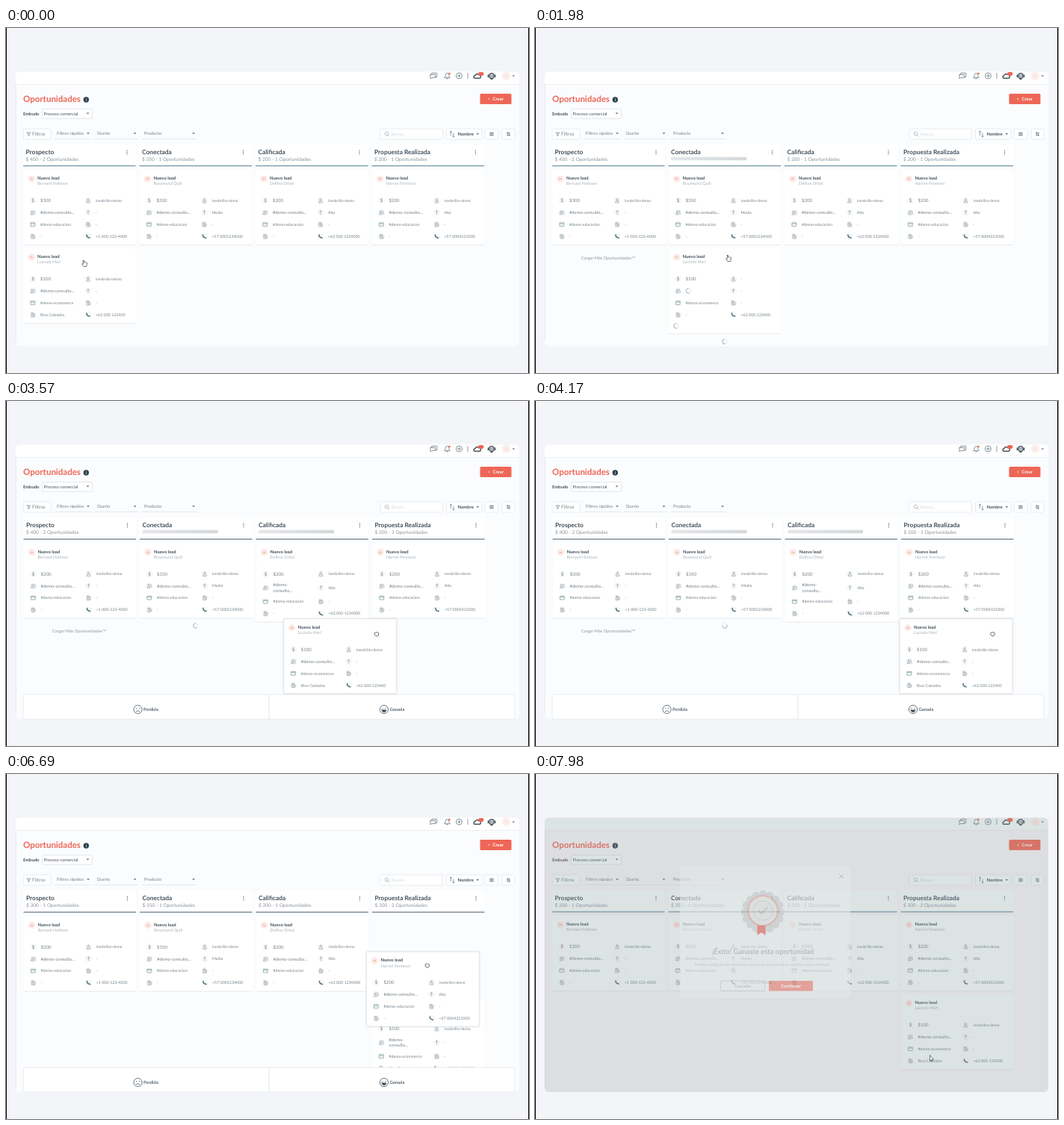
An HTML page that plays this animation: 700x462 px, repeating every 8000 ms.

```html
<!DOCTYPE html>
<html lang="es">
<head>
<meta charset="utf-8">
<title>Tablero de oportunidades</title>
<style>
  html, body { margin: 0; width: 100%; height: 100%; overflow: hidden; background: #f3f5f8; }
  svg { display: block; width: 100%; height: 100%; font-family: Lato, "Open Sans", sans-serif; text-rendering: geometricPrecision; }
  .lift { filter: drop-shadow(0 .5px 1px #0002); }
</style>
</head>
<body>
<svg id="stage" viewBox="0 0 700 462"></svg>
<script>
const LOOP = 8000, RED = '#ee6656', INK = '#43515d', MID = '#74808a', PALE = '#a9b1b8', EDGE = '#e3e7eb';
const stage = document.getElementById('stage');
const colX = [23, 178.5, 334, 489.5];
const titles = ['Prospecto', 'Conectada', 'Calificada', 'Propuesta Realizada'];
const USER = 'inesbrillo+demo', TAG = '#demo-educacion';

const lead = (name, price, level, tag, firm, phone) => ({ name, price, level, tag, firm, phone });
const leads = [
  lead('Bernard Hollowe', '$300', '-', TAG, '-', '+1 000-123-4000'),
  lead('Rosamund Quill', '$350', 'Media', TAG, '-', '+57 0001234000'),
  lead('Delfina Orbel', '$200', 'Alta', TAG, '-', '+62 000 1234000'),
  lead('Harriet Fenmoor', '$200', 'Alta', TAG, '-', '+57 0004321000')
];
const mover = lead('Lucinda Marl', '$100', '-', '#demo-ecommerce', 'Rivo Calzados', '+62 000 123400');

// dx, dy: where the pointer holds the card
const drags = [
  { from: 560, to: 1560, col: 0, dx: 87.7, dy: 22.3 },
  { from: 2450, to: 2900, col: 1, dx: 84, dy: 18 },
  { from: 3270, to: 4560, col: 2, dx: 124.5, dy: 20.3 },
  { from: 6460, to: 7150, col: 3, dx: 81.5, dy: 18.3, first: true }
];
const DROP1 = 1560, DROP2 = 2900, DROP3 = 4560, SETTLED = 6150, MODAL = 7830;

// time, x, y of the pointer
const path = [
  [0, 105, 315], [610, 105, 319], [1500, 259, 308], [2450, 259, 308], [2860, 416, 311], [2920, 416, 311],
  [3230, 458, 312], [3270, 458, 312], [4200, 613, 312], [4560, 613, 312], [5300, 568, 262], [6330, 568, 262],
  [6460, 575, 208], [6515, 575, 208], [7060, 530, 405], [7150, 530, 405], [7400, 530, 381], [LOOP, 530, 381]
];

const mix = (a, b, k) => a + (b - a) * k;
const tint = (a, b, k) => `rgb(${a.map((v, i) => Math.round(mix(v, b[i], k)))})`;

function pointerAt(t) {
  const i = path.findIndex(p => p[0] > t), a = path[i - 1], b = path[i];
  const u = (t - a[0]) / (b[0] - a[0]), k = u * u * (3 - 2 * u);
  return [mix(a[1], b[1], k), mix(a[2], b[2], k)];
}

// y is the middle of the capitals
const text = (x, y, s, size, fill = MID, weight = 400, more = '') =>
  `<text x="${x}" y="${y + size * .36}" font-size="${size}" fill="${fill}" font-weight="${weight}" ${more}>${s}</text>`;
const box = (x, y, w, h, fill, stroke = 'none', r = 1.5, more = '') =>
  `<rect x="${x}" y="${y}" width="${w}" height="${h}" rx="${r}" fill="${fill}" stroke="${stroke}" stroke-width=".8" ${more}/>`;
const dot = (x, y, r, fill, stroke = 'none', w = .8) =>
  `<circle cx="${x}" cy="${y}" r="${r}" fill="${fill}" stroke="${stroke}" stroke-width="${w}"/>`;
const draw = (x, y, d, stroke = MID, w = .8, fill = 'none') =>
  `<path transform="translate(${x} ${y})" d="${d}" fill="${fill}" stroke="${stroke}" stroke-width="${w}" stroke-linecap="round" stroke-linejoin="round"/>`;
const caret = (x, y) => draw(x, y, 'M-1.8-.9h3.6L0 1z', 'none', 0, '#5d6973');
const middle = 'text-anchor="middle"';

const icons = {
  user: 'M-1.2-1.3a1.2 1.2 0 1 0 2.4 0a1.2 1.2 0 1 0-2.4 0M-2.3 2.5q0-2.3 2.3-2.3t2.3 2.3z',
  people: 'M-2.2-1a1.1 1.1 0 1 0 2.2 0a1.1 1.1 0 1 0-2.2 0M-3 2.4q0-2 1.9-2t1.9 2zM.9-2.2q1.6 0 1.5 1.2t-1 1.1q1.6.3 1.7 2',
  purse: 'M-2.7-2.2h5.4v4.6h-5.4zM-2.7-1h5.4',
  firm: 'M-2.1 2.5v-5h2.7v5zM.6-.8h1.8v3.3h-1.8M-1.2-1.1h.8M-1.2.5h.8',
  up: 'M0 2.3v-4.6M-1.6-.8L0-2.3l1.6 1.5',
  phone: 'M-2.1-2.1q.3 3.7 4.2 4.2'
};
function icon(kind, x, y) {
  const back = dot(x, y, 4.6, '#f6f8f9');
  if (kind === 'cash') return back + text(x, y, '$', 6.2, MID, 400, middle);
  return back + (kind === 'phone'
    ? draw(x, y, icons.phone, '#4f6c78', 1.5)
    : draw(x, y, icons[kind], kind === 'purse' ? '#84a39f' : '#96a1aa', .7));
}

const spinner = (x, y, t) =>
  dot(x, y, 3.2, 'none', '#e4e7e9', .9) +
  `<g transform="rotate(${t * .45} ${x} ${y})">${draw(x, y, 'M0-3.2a3.2 3.2 0 0 1 0 6.4', '#a6aeb5', .9)}</g>`;

function card(x, y, d, paper, t, { wrap, busy, lift } = {}) {
  const rows = [41, 57, 73, 89].map((v, i) => y + v + (wrap ? [0, 2.5, 5, 5][i] : 0));
  const h = busy ? 114 : wrap ? 105 : 100;
  const left = ['cash', 'people', 'purse', 'firm'], right = ['user', 'up', 'firm', 'phone'];
  let s = lift
    ? `<g class="lift">${box(x, y, 151, h, paper, '#dde1e5')}</g>`
    : box(x, y + 1, 151, h, '#e8ecef') + box(x, y, 151, h, paper);
  s += dot(x + 11, y + 12, 4.6, '#fde9e5') + text(x + 11, y + 12, 'NL', 3.2, '#e99a8f', 700, middle);
  s += text(x + 19, y + 11, 'Nuevo lead', 5.9, INK, 700) + text(x + 19, y + 18.5, d.name, 5.5, PALE);
  rows.forEach((r, i) => s += icon(left[i], x + 13, r) + icon(right[i], x + 87, r));
  s += text(x + 23, rows[0], d.price, 6);
  if (busy) s += spinner(x + 27, rows[1], t) + spinner(x + 10.5, y + 104, t);
  else if (wrap) s += text(x + 23, rows[1] - 3.6, '#demo-', 5.8) + text(x + 23, rows[1] + 3.6, 'consulto...', 5.8);
  else s += text(x + 23, rows[1], '#demo-consulto...', 5.8);
  s += text(x + 23, rows[2], d.tag, 5.2) + text(x + 23, rows[3], busy ? '-' : d.firm, 5.3);
  s += text(x + 97, rows[0], busy ? '-' : USER, 5) + text(x + 97, rows[1], d.level, 5.2);
  return s + text(x + 97, rows[2], '-', 5.2) + text(x + 97, rows[3], d.phone, 5.3);
}

function topBar(paper) {
  return `<path d="M13 75.5V64.5q0-6 6-6H681q6 0 6 6V75.5z" fill="${paper}"/>` +
    draw(13, 75.5, 'M0 0H674', '#e9ecef') +
    draw(572, 64, 'M-4-1.5h1.8v-2.2h7v5.2h-1.6M-4-1.5v5.4l1.6-1.4h5v-4h-4.8', '#6d7983') +
    draw(590.5, 64, 'M-3.5 2.4q1.2-1 1.2-3 .2-3 2.3-3t2.3 3q0 2 1.2 3zM-1 3.8h2', '#6d7983') + dot(593.5, 61, 1.3, RED) +
    dot(606.5, 64, 4, 'none', '#6d7983') + draw(606.5, 64, 'M-2 0h4M0-2v4', '#6d7983') +
    draw(618, 64, 'M0-3.5v7') +
    draw(631, 65, 'M-4 2.2q-2.4-3 1-3.4 1-3.4 4-1.6 3.6.2 3.4 3.4-.4 2-2.4 1.6z', '#4a565f', 1.5) + box(632, 59, 7.5, 5, RED, 'none', 2.4) +
    draw(650, 64, 'M-4.6-1v2.4M4.6-1v2.4', '#4a565f', 1.5) + dot(650, 64, 3.3, '#c3c9ce', '#4a565f', 1.3) +
    draw(650, 64, 'M-1.2 0h0M1.2 0h0M-1 4.4h2', '#3d4952', 1.2) +
    dot(669.5, 64, 5.7, '#fdeeec') + text(669.5, 64, 'L', 4.5, '#eeb4ad', 400, middle) + caret(679.3, 64.3);
}

function toolbar(paper) {
  const pick = (x, w, s) => text(x + 3, 141, s, 5.8) + caret(x + w - 4, 141.2) + draw(x, 148.5, `M0 0h${w}`, '#d5dade', .6);
  const button = (x, w) => box(x, 135, w, 14, paper, EDGE);
  return text(23, 95, 'Oportunidades', 11.5, RED, 700) +
    dot(107.3, 96, 3.7, '#2f4350') + text(107.3, 96, 'i', 5, '#fff', 700, middle) +
    box(634.5, 88, 42, 14, RED) + text(644.5, 95, '+', 6, '#fff') + text(651.5, 95, 'Crear', 6, '#fff', 700) +
    text(23, 115, 'Embudo', 5.8, INK, 700) + box(48.4, 108.7, 67, 12.5, paper, '#dce0e4') +
    text(50.5, 115, 'Proceso comercial', 5.8, INK) + caret(109.5, 114.5) +
    button(23, 37) + draw(30.5, 142, 'M-2.4-2h4.8l-1.8 2v2l-1.2.6V0z', MID, .7) + text(35, 142, 'Filtros', 6.4) +
    pick(65, 49, 'Filtros rápidos') + pick(119, 57.5, 'Dueño') + pick(182, 73, 'Producto') +
    button(501, 83.5) + dot(509.5, 141.5, 2.3, 'none', PALE) + draw(511.3, 143.3, 'M0 0l1.8 1.8', PALE) + text(516, 142, 'Buscar...', 5.4, '#d0d5da') +
    button(589.5, 47.5) + draw(597, 141.5, 'M-1.5 2v-5.5m-1.2 1.3l1.2-1.3 1.2 1.3M2-.5v5m-1.2-1.2L2 4.5l1.2-1.2') +
    text(604.5, 142, 'Nombre', 5.9, INK, 700) + caret(631.3, 142) +
    button(641, 18) + draw(650, 142, 'M-2.3-1.8h4.6M-2.3 0h4.6M-2.3 1.8h4.6', '#6a7680', 1.1) +
    button(664, 17) + draw(672.5, 142, 'M-2-1.7h4M-2 0h4M-2 1.7h4M-1-2.4v1.4M1 1v1.4', '#6a7680');
}

function header(i, total, dragging, paper, off) {
  const x = colX[i] + off;
  return box(x, 156, 150.5, 29, paper, 'none', 1) +
    box(x, 183.8 + off, 150.5, 1.5, dragging ? '#858f9a' : '#7fa0b0', 'none', 0) +
    text(x + 3.5, 166, titles[i], 8.4, INK, 700) +
    draw(x + 139, 166.5, 'M0-2.3v0M0 0v0M0 2.3v0', '#4d5963', 1.3) +
    (total ? text(x + 3.5, 175.5, `$ ${total} Oportunidades`, 6.5, '#8a949c')
           : box(x + 3.5, 172.7, 101, 4.6, 'url(#bone)', 'none', 1));
}

const totalsAt = t => [
  t < DROP3 ? '400 - 2' : '300 - 1',
  t >= DROP1 && t < DROP3 ? '' : '350 - 1',
  t < DROP2 ? '200 - 1' : t < DROP3 ? '' : t < SETTLED ? '300 - 2' : '200 - 1',
  t < DROP3 ? '200 - 1' : t < SETTLED ? '' : '300 - 2'
];

const loadMore = x => text(x + 39, 307.5, 'Cargar Más Oportunidades', 5.7, '#8a939b') +
  draw(x + 109, 307, 'M-1.8-.9L0 .9 1.8-.9', '#8a939b');

function board(t, drag, paper) {
  const off = drag ? .5 : 0, totals = totalsAt(t);
  const home = t < DROP1 ? 0 : t < DROP2 ? 1 : t < DROP3 ? 2 : 3;
  const since = t - [-LOOP, DROP1, DROP2, DROP3][home], busy = home > 0 && since < 700;
  let s = '';
  colX.forEach((x, i) => {
    const wrap = drag && drag.col === i;
    s += header(i, totals[i], drag, paper, off);
    if (!(wrap && drag.first)) s += card(x + off, 190 + off, leads[i], paper, t, { wrap });
  });
  const x = colX[home];
  if (!drag || drag.first) {
    s += card(x, drag ? 300 : 295, mover, paper, t, { wrap: drag, busy });
    if (home && t < SETTLED) s += spinner(x + 75.5, busy ? 420 : 406.5, t);
  }
  if (t >= DROP1 && t < DROP3) s += loadMore(colX[0]);
  if (t >= DROP3 && t < SETTLED) s += loadMore(colX[2]);
  if (t >= DROP2 && t < DROP3 || drag && drag.col === 1) s += spinner(254, 301, t);
  return s;
}

function dropBar() {
  const face = (x, mouth, s) => dot(x, 413, 5.6, 'none', '#5b6872', .9) +
    draw(x, 413, 'M-2-1.5v.3M2-1.5v.3', INK, 1.1) + mouth + text(x + 7.5, 413, s, 5.9, '#5b6872', 700);
  return box(23, 393, 329, 33, '#fff', EDGE, 1) + box(352, 393, 329, 33, '#fff', EDGE, 1) +
    face(176.5, draw(176.5, 413, 'M-2.4 2.8q2.4-2.6 4.8 0', INK), 'Perdida') +
    face(506, draw(506, 413, 'M-3 .8h6q-.5 3-3 3t-3-3z', INK, .6, INK), 'Ganada');
}

function modal(k) {
  let rim = '';
  for (let i = 0; i < 16; i++) {
    const a = i * Math.PI / 8;
    rim += dot(305 + 24 * Math.cos(a), 185 + 24 * Math.sin(a), 5, '#c3cacc');
  }
  return `<g opacity="${k * .6}">` + box(194, 123, 228, 177, '#e5e9e9', 'none', 2) +
    draw(410, 137, 'M-2.5-2.5l5 5M2.5-2.5l-5 5', '#9aa2a2', 1) +
    rim + dot(305, 185, 24, '#c3cacc') + dot(305, 183, 20, '#d9dddd', '#e39a90', 2.2) + dot(305, 183, 13, 'none', '#d0bcb7', 1) +
    draw(305, 183, 'M-6 0l4 4 8-8', '#d0aaa3', 1.6) +
    draw(303, 203, 'M-5.5 0h11v13l-5.5-4-5.5 4z', 'none', 0, '#dc5a4c') +
    text(305, 238, '¡Éxito! Ganaste esta oportunidad', 9.5, '#848e92', 400, middle) +
    text(304, 255.5, 'Puedes configurar los resultados que verás al pasar de un contrato para continuar', 5.1, '#aab1b3', 400, middle) +
    box(248.5, 277, 59, 13.5, 'none', '#b4bbbc') + text(278, 283.7, 'Cancelar', 6, '#9ca4a6', 400, middle) +
    box(313, 277, 59, 13.5, '#e8776a') + text(342.5, 283.7, 'Continuar', 6, '#fff', 700, middle) + '</g>';
}

function pointer(t, [x, y], drag) {
  if (t >= MODAL) return draw(x - 1.5, y - 4, 'M0 0v7l1.6-1.4 1 2.2 1-.5-1-2.1h2z', '#3a444c', .7, '#fff');
  if (drag) return draw(x, y, 'M-2.6-1.4q.8-1.4 1.6-.6.8-1 1.6 0 .9-.7 1.9.6v2.4q-.5 1.8-2.5 1.8t-2.6-1.8z', '#4d5860', .9, '#fff');
  return draw(x, y, 'M-1.7-3.6v4.8l-1-.8q-1 .2-.5 1.1l2 3h3.8l.8-3.2v-1.8q-.9-.9-1.4-.2-.6-.7-1.3-.2-.5-.5-1.1-.2v-2.5q-.7-.9-1.3 0z', '#4d5860', .8, '#fff');
}

function render(t) {
  const k = Math.min(1, Math.max(0, (t - MODAL) / 150));
  const paper = tint([255, 255, 255], [243, 254, 255], k), page = tint([251, 252, 254], [247, 248, 252], k);
  const drag = drags.find(d => t >= d.from && t < d.to), at = pointerAt(t);
  let s = '<defs><linearGradient id="bone"><stop stop-color="#e5e7ea"/><stop offset="1" stop-color="#d4d8db"/></linearGradient></defs>';
  s += box(0, 0, 700, 462, '#f3f5f8', 'none', 0) + box(13, 58.5, 674, 367.5, page, 'none', 6);
  s += draw(13.4, 76, 'M0 0V342', '#e4e8eb', .8) + topBar(paper) + toolbar(paper) + board(t, drag, paper);
  if (drag) {
    s += dropBar() + card(at[0] - drag.dx, at[1] - drag.dy, drag.first ? leads[3] : mover, paper, t, { lift: true });
  }
  if (k) s += box(13, 58.5, 674, 367.5, '#969696', 'none', 6, `opacity="${.27 * k}"`) + modal(k);
  s += pointer(t, at, drag);
  stage.innerHTML = s + box(0, 0, 1, 462, '#000', 'none', 0) + box(699, 0, 1, 462, '#000', 'none', 0);
}

const start = performance.now();
function tick() {
  render((performance.now() - start) % LOOP);
  requestAnimationFrame(tick);
}
tick();
</script>
</body>
</html>
```
